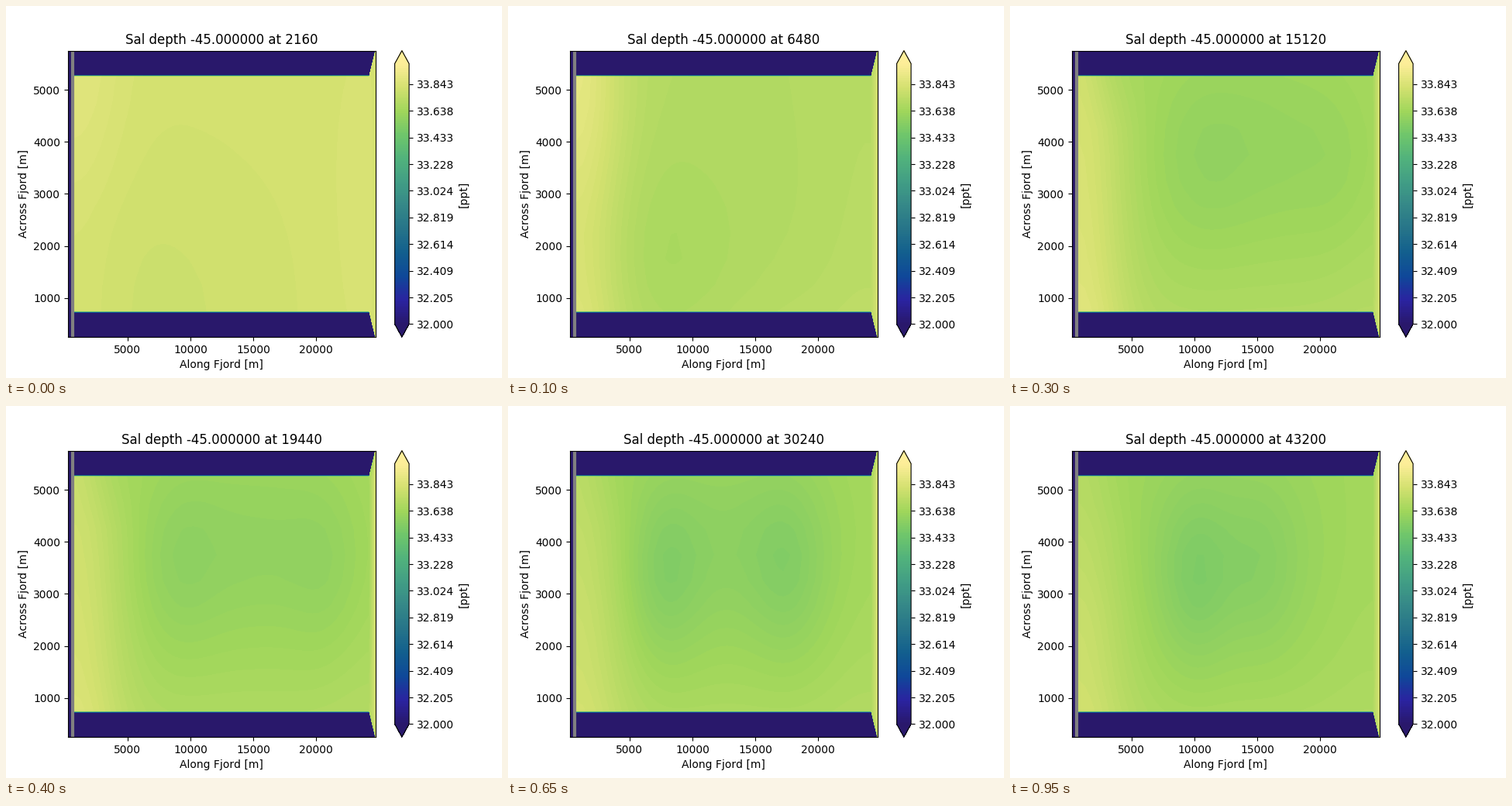
A matplotlib script for the animation above (1000 ms loop, 640 px wide and 480 px high).

```python
import numpy as np
import matplotlib.pyplot as plt
from matplotlib.animation import FuncAnimation
from matplotlib.colors import LinearSegmentedColormap

plt.rcParams["text.kerning_factor"] = 6

FRAMES, INTERVAL, STEP_SECONDS = 20, 50, 2160
LEVELS = np.linspace(32, 34, 128)
BOUNDARY_SALINITY = 33.82

HALINE = LinearSegmentedColormap.from_list("haline", [
    "#29186b", "#2a23a0", "#0f4799", "#125f8e", "#267489", "#358888",
    "#419d85", "#51b27c", "#6fc66b", "#a0d65b", "#d4e170", "#fdee99"])

# Cell centres in km
x = np.arange(0.25, 25, 0.5)
y = np.arange(0.25, 6, 0.5)
X, Y = np.meshgrid(x, y)


def bump(amp, cx, cy, rx, ry):
    return amp * np.exp(-((X - cx) / rx) ** 2 - ((Y - cy) / ry) ** 2)


def background(step):
    """Quick freshening, then a slow drift, saltier along the south wall."""
    level = 33.665 - .0015 * step + .153 * np.exp(-(step / 1.8) ** 3)
    south = .035 * min(step / 3, 1) * np.clip((5.25 - Y) / 4.5, 0, 1) ** 4
    return level + south + bump(.018, 24, 2.5, 3.5, 4)


def inflow(step):
    """Salty tongue along the western edge, retreating from the north."""
    strength = np.interp(step, [0, 3, 11, 19], [.03, .21, .135, .14])
    north = np.interp(step, [0, 3, 19], [1, 0, -.4])
    profile = 1 + north * np.clip((Y - 2.5) / 2.5, 0, 1)
    corner = -.05 * np.interp(step, [1, 6, 19], [0, 1, .4])
    return (strength * profile * np.exp(-((X - .75) / 3.8) ** 2)
            + bump(corner, 3.3, 5.4, 2.5, .8))


def west_eddy(step):
    """Wide southern patch that tightens into a drifting eddy."""
    spread = np.exp(-step / 3)
    amp = np.interp(step, [0, 1, 3, 15, 19], [.03, .08, .015, .1, .085])
    cx = np.interp(step, [0, 6, 11, 19], [5, 10.2, 6.9, 10.1])
    cy = np.interp(step, [1, 6, 19], [.7, 3.6, 3.2])
    return bump(-amp, cx, cy, 3 + 9 * spread, 1.7 + 1.5 * spread)


def east_eddy(step):
    amp = np.interp(step, [3, 12, 19], [0, .065, .05])
    cx = np.interp(step, [6, 11, 15], [22, 19.8, 15.5])
    return bump(-amp, cx, 3.4, 3, 1.7)


def basin(step):
    amp = np.interp(step, [3, 6, 11, 19], [0, .055, .085, .05])
    cx = np.interp(step, [6, 19], [16, 12])
    return bump(-amp, cx, 3.9, 8, 1.9)


def salinity(step):
    field = sum(part(step) for part in
                (background, inflow, west_eddy, east_eddy, basin))
    field[[0, -1], :] = 0
    field[:, -1] = BOUNDARY_SALINITY
    field[:, 0] = 0
    return field


def draw_field(step):
    return ax.contourf(x * 1000, y * 1000, salinity(step), LEVELS,
                       cmap=HALINE, extend="both")


def update(step):
    for old in list(ax.collections):
        old.remove()
    contours = draw_field(step)
    title.set_text(f"Sal depth -45.000000 at {STEP_SECONDS * (step + 1)}")
    return contours, title


fig, ax = plt.subplots(figsize=(6.4, 4.8), dpi=100)
fig.colorbar(draw_field(0), ax=ax, format="%.3f", label="[ppt]")
ax.axvline(600, color="gray", lw=3)
ax.set(xlabel="Along Fjord [m]", ylabel="Across Fjord [m]",
       xlim=(250, 24750), ylim=(250, 5750))
title = ax.set_title("")

anim = FuncAnimation(fig, update, frames=FRAMES, interval=INTERVAL,
                     repeat=True, repeat_delay=0)
plt.show()
```
